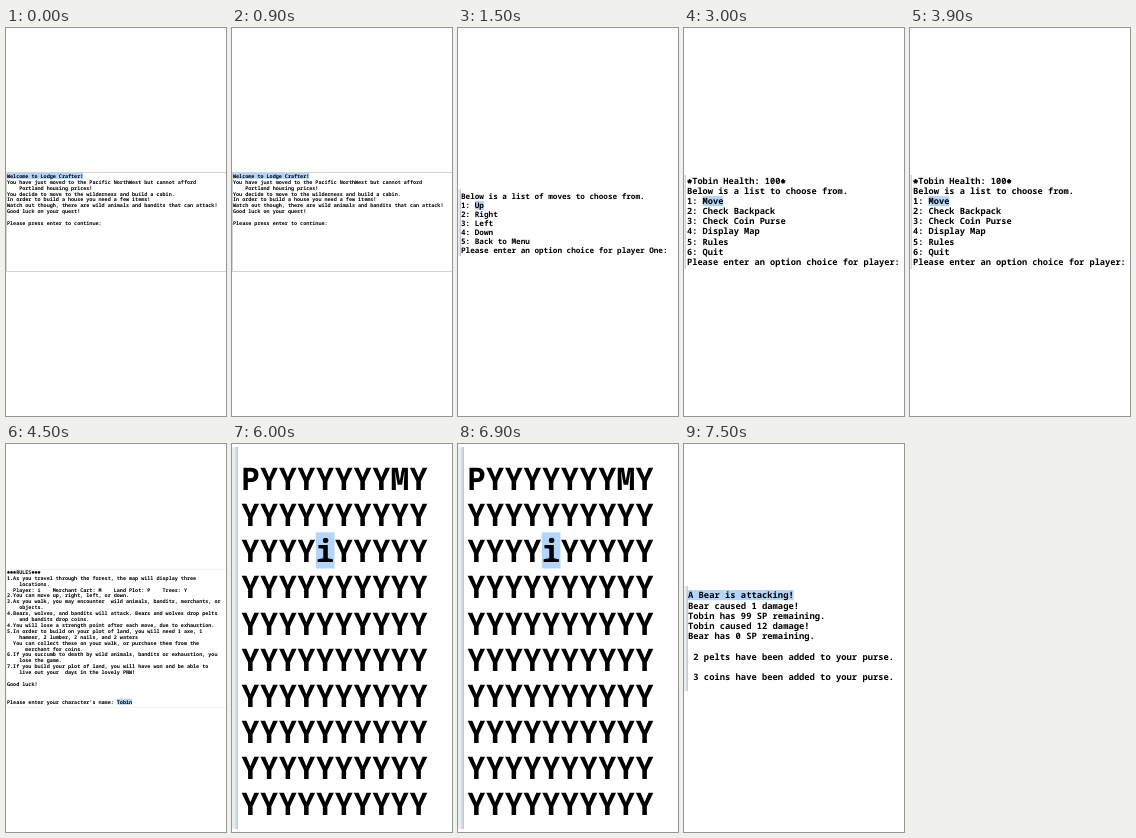
An HTML page that plays this animation: 220 by 388 pixels, repeating every 8000 ms.

```html
<!DOCTYPE html>
<html lang="en">
<head>
<meta charset="utf-8">
<title>Text adventure</title>
<style>
html, body {
  margin: 0;
  width: 100%;
  height: 100%;
  overflow: hidden;
  background: #fff;
}
.reel {
  width: 220px;
  animation: screens 8s step-end infinite;
}
@keyframes screens {
  0% { transform: translateY(0); }
  18.75% { transform: translateY(-388px); }
  37.5% { transform: translateY(-776px); }
  56.25% { transform: translateY(-1164px); }
  75% { transform: translateY(-1552px); }
  93.75% { transform: translateY(-1940px); }
}
section {
  position: relative;
  width: 220px;
  height: 388px;
  overflow: hidden;
}
/* window edge beside the console */
section::before {
  content: "";
  position: absolute;
  box-sizing: border-box;
  left: 0;
  top: var(--top);
  width: var(--bar);
  height: var(--height);
  background: linear-gradient(90deg, #e9edf0 40%, #bcc3c9);
}
.framed::before {
  width: 220px;
  background: none;
  border: solid var(--edge);
  border-width: 1px 0 1px 1px;
}
/* 50px type has a 30px advance; each screen scales it to its own advance */
pre {
  position: absolute;
  left: var(--x);
  top: var(--y);
  margin: 0;
  font: 700 50px/58px "Noto Sans Mono", "DejaVu Sans Mono", monospace;
  font-variant-ligatures: none;
  text-rendering: geometricPrecision;
  color: #000;
  transform-origin: 0 0;
  transform: scale(calc(var(--advance) / 30));
}
mark {
  display: inline-block;
  background: #b3d5fb;
  color: inherit;
}
.star {
  position: relative;
  top: 8px;
  -webkit-text-stroke: 4px #000;
}
</style>
</head>
<body>
<div class="reel">
<section class="framed" style="--edge:#d4d4d4; --top:144px; --height:100px; --x:0.8px; --y:144.7px; --advance:3.05">
<pre>
<mark>Welcome to Lodge Crafter!</mark>
You have just moved to the Pacific NorthWest but cannot afford
    Portland housing prices!
You decide to move to the wilderness and build a cabin.
In order to build a house you need a few items!
Watch out though, there are wild animals and bandits that can attack!
Good luck on your quest!

Please press enter to continue:</pre>
</section>
<section style="--top:161px; --height:67px; --bar:3px; --x:2.8px; --y:164.4px; --advance:4.59">
<pre>
Below is a list of moves to choose from.
1: <mark>Up</mark>
2: Right
3: Left
4: Down
5: Back to Menu
Please enter an option choice for player One:</pre>
</section>
<section style="--top:147px; --height:94px; --bar:2px; --x:2.7px; --y:148.3px; --advance:5.19">
<pre>
<span class="star">*</span>Tobin Health: 100<span class="star">*</span>
Below is a list to choose from.
1: <mark>Move</mark>
2: Check Backpack
3: Check Coin Purse
4: Display Map
5: Rules
6: Quit
Please enter an option choice for player:</pre>
</section>
<section class="framed" style="--edge:#f3f3f3; --top:125px; --height:139px; --x:0.8px; --y:125.2px; --advance:3.05">
<pre>
<span class="star">***</span>RULES<span class="star">***</span>
1.As you travel through the forest, the map will display three
    locations.
  Player: i    Merchant Cart: M    Land Plot: P    Trees: Y
2.You can move up, right, left, or down.
3.As you walk, you may encounter  wild animals, bandits, merchants, or
    objects.
4.Bears, wolves, and bandits will attack. Bears and wolves drop pelts
    and bandits drop coins.
4.You will lose a strength point after each move, due to exhaustion.
5.In order to build on your plot of land, you will need 1 axe, 1
    hammer, 2 lumber, 2 nails, and 2 waters
  You can collect these on your walk, or purchase them from the
      merchant for coins.
6.If you succumb to death by wild animals, bandits or exhaustion, you
    lose the game.
7.If you build your plot of land, you will have won and be able to
    live out your  days in the lovely PNW!

Good luck!


Please enter your character's name: <mark>Tobin</mark></pre>
</section>
<section style="--top:3px; --height:382px; --bar:6px; --x:8.5px; --y:15.6px; --advance:18.7">
<pre>
PYYYYYYYMY
YYYYYYYYYY
YYYY<mark>i</mark>YYYYY
YYYYYYYYYY
YYYYYYYYYY
YYYYYYYYYY
YYYYYYYYYY
YYYYYYYYYY
YYYYYYYYYY
YYYYYYYYYY</pre>
</section>
<section style="--top:142px; --height:105px; --bar:4px; --x:4px; --y:146px; --advance:5.285">
<pre>
<mark>A Bear is attacking!</mark>
Bear caused 1 damage!
Tobin has 99 SP remaining.
Tobin caused 12 damage!
Bear has 0 SP remaining.

 2 pelts have been added to your purse.

 3 coins have been added to your purse.</pre>
</section>
</div>
</body>
</html>
```
